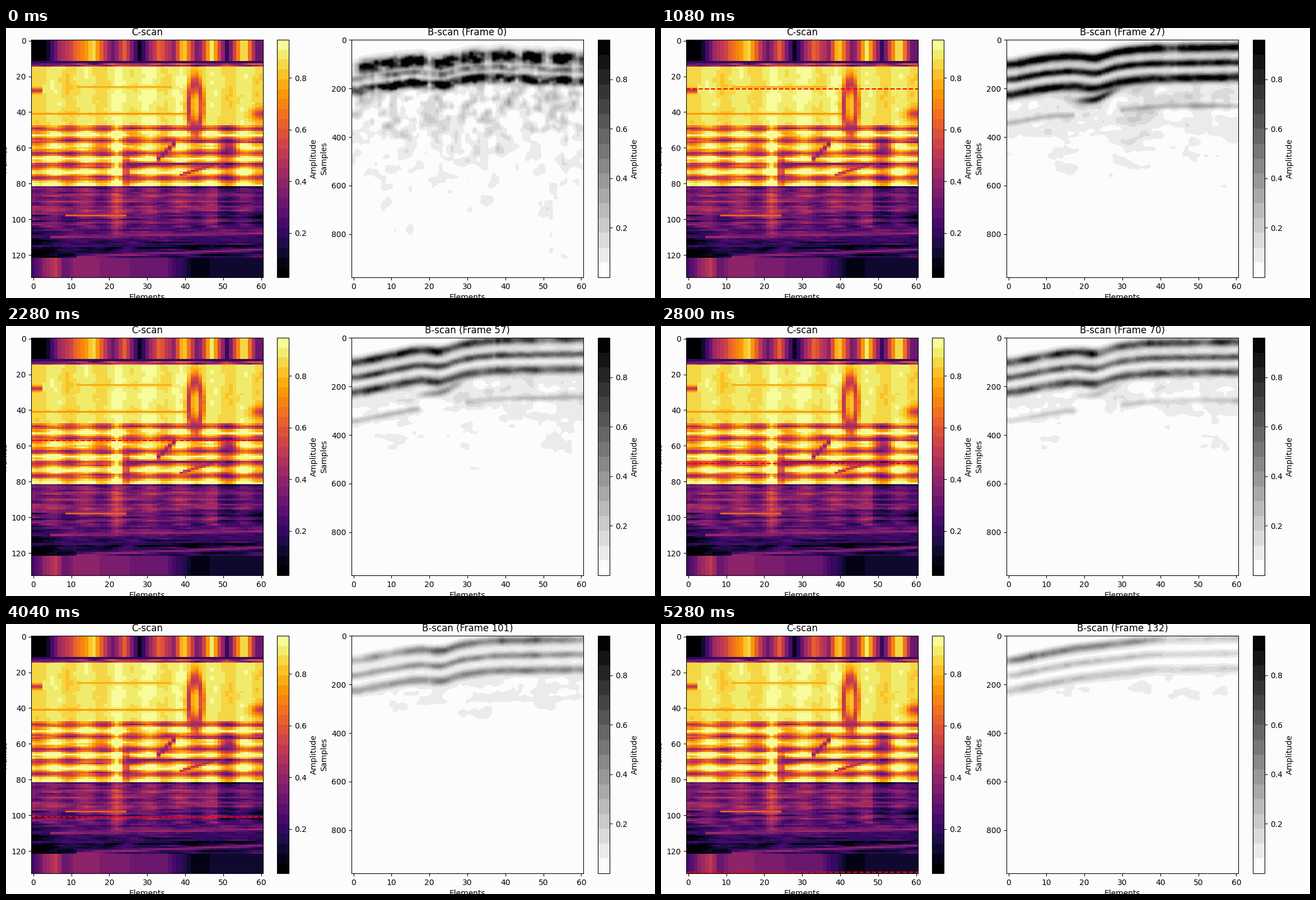
These frames come from a looping animation (1159x483 px, 5.32 s). A matplotlib script:

```python
import numpy as np
import matplotlib.pyplot as plt
from matplotlib.animation import FuncAnimation
from matplotlib.colors import ListedColormap

W, H, DPI = 1159, 483, 100
FRAMES, COLS, DEPTH = 133, 61, 978
PAPER = "#fcfcfc"
rng = np.random.default_rng(7)
plt.rcParams["font.family"] = "DejaVu Sans"

elements = np.arange(COLS)
rows = np.arange(FRAMES)[:, None]
depth = np.arange(0, DEPTH, 2)[:, None]


def smooth(a, sigma, axis):
    reach = int(3 * sigma) + 1
    kernel = np.exp(-0.5 * (np.arange(-reach, reach + 1) / sigma) ** 2)
    kernel /= kernel.sum()
    pad = [(0, 0), (0, 0)]
    pad[axis] = (reach, reach)
    return np.apply_along_axis(np.convolve, axis, np.pad(a, pad, mode="reflect"),
                               kernel, "valid")


def noise(count, sy, sx):
    field = smooth(smooth(rng.standard_normal((count, COLS)), sy, 0), sx, 1)
    return field / field.std()


def bump(x, centre, width):
    return np.exp(-((x - centre) / width) ** 2)


def wave(x, peak, period):
    return np.cos(2 * np.pi * (x - peak) / period)


def sigmoid(x):
    return 1 / (1 + np.exp(-np.clip(x, -60, 60)))


def curve(*points):
    """Piecewise-linear profile across the elements."""
    return np.interp(elements, *zip(*points))


def make_cscan():
    coupling = wave(elements, 5.5, 8.33)
    head = curve((3, .03), (7, .42), (16, .85), (21, .3), (24, .62), (28, .1), (33, .62),
                 (37, .4), (39.5, .88), (43.5, .3), (47, .9), (51, .2), (55.5, .95), (59, .3))
    tail = curve((0, .24), (6, .52), (8, .31), (12, .4), (28, .32), (34, .33), (42, .1), (60, .12))
    bright = .87 + .03 * coupling + .035 * bump(elements, 28.5, 8) ** .5
    bright = np.minimum(bright, .925) + .01 * noise(FRAMES, 2, .6)

    # Seeded stripes that climb to the right in the deepest rows
    slanted = rows + np.where(rows > 95, elements / 24, 0)
    stripes = np.interp(slanted, rows[:, 0], rng.normal(0, .065, FRAMES))
    striped = .74 - .2 * wave(rows, 49, 7) + .09 * coupling + .6 * stripes
    striped += .2 * bump(elements, 22, 1.2) - .12 * bump(elements, 51, 3)
    dark = np.interp(slanted, [82, 103, 109, 121], [.37, .33, .2, .15]) + stripes
    dark += np.where(rows < 105, .05 * coupling - .08 * (elements > 48),
                     -.13 * bump(elements, 0, 5))
    dark += .12 * bump(elements, 22, 1.5) * (rows < 111)

    scan = np.where(rows < 48, bright, striped + .05 * noise(FRAMES, .5, 2.5))
    scan = np.where(rows < 82, scan, dark + .04 * noise(FRAMES, .3, 1.5))

    def blend(mask, value):
        scan[:] += mask * (value - scan)

    def streak(c0, r0, c1, r1, value, width=.7):
        line = r0 + (r1 - r0) * (elements - c0) / (c1 - c0)
        blend(bump(rows, line, width) * (elements >= c0) * (elements <= c1), value)

    ring = np.hypot((elements - 42.7) / 1.7, (rows - 36.5) / 12.5)
    blend(.85 * bump(ring, 1, .45), .45)
    blend(.8 * bump(elements, 24.5, .9) * bump(rows, 73, 11), .35)
    blend(.8 * bump(elements, 51.5, 2.2) * bump(rows, 60, 3), .32)
    blend(.8 * bump(elements, 60, 2.5) * bump(rows, 41, 3), .42)
    streak(0, 28, 2, 28, .5, 1.3)
    streak(12, 26, 36, 26, .77)
    streak(0, 41, 40, 41, .73)
    streak(33, 66, 37, 58, .38, 1.6)
    streak(39, 75, 47, 70, .45, .9)
    streak(25, 69, 50, 69, .35)
    streak(9, 98, 24, 98, .62)
    streak(5, 110, 60, 108, .42)
    streak(12, 121, 60, 117, .4, .9)

    scan[:12] = head
    scan[12] = .2
    scan[13:15] = .41 + .09 * noise(2, .3, 1.5)
    scan[122:] = tail
    return np.clip(scan, .03, .948)


cscan = make_cscan()
mottle = [noise(len(depth), 6, .7) for _ in range(2)]
layers = [noise(len(depth), 5, 2.2) for _ in range(2)]
ripple = [noise(len(depth), 4, .6) for _ in range(2)]


def drift(pair, phase):
    return np.cos(phase) * pair[0] + np.sin(phase) * pair[1]


def surface_depth(t, early, late):
    end = 17 + 13 * wave(t, 29, 56)
    line = curve((0, 104), (10, 72 + .1 * end), (18, 44 + .7 * end), (37, end + 6), (60, end))
    line += 20 * (1 - late) * bump(elements, 23, 3.5)
    line += early * (14 + .9 * elements)
    return smooth(line[None], 1.2, 1)[0]


def bscan(frame):
    t = min(max(frame, 11), 122)
    early = np.clip((15 - t) / 4, 0, 1)
    late = np.clip((t - 100) / 22, 0, 1)
    phase = t / 14
    surface = surface_depth(t, early, late)
    offset = 124 - 32 * early
    last = surface + offset

    near = .93 * cscan[frame] ** .8
    gap = ((1 + wave(elements, 20, 7.8)) / 2) ** 3 * (elements > 17)
    broken = .9 * (1 - .65 * gap) * sigmoid((elements - 1.5) * 2)
    near = early * broken + (1 - early) * near
    common = (.55 * np.median(near) + .45 * near) * (1 - .45 * late)
    rough = 1 + (.07 + .2 * early) * drift(ripple, phase)

    # Three echoes over a faint pedestal
    echo = near * bump(depth, surface, 17 + 7 * early)
    echo = np.maximum(echo, (.95 - .6 * early) * common * bump(depth, surface + offset / 2, 15))
    echo = np.maximum(echo, common * bump(depth, last, 18))
    inside = sigmoid((depth - surface + 22) / 6) * sigmoid((last + 22 - depth) / 9)
    value = (echo + .13 * common * inside) * rough
    value += .11 * common * bump(depth, surface, 42 + 15 * early)

    # Deeper reflection, split around a strong spot in the middle
    spot = .8 * bump(t, 27, 35) * (1 - early) * bump(elements, 23.5, 7) ** 2
    value += spot * bump(depth, last + 45 - 2.6 * (elements - 23), 15)
    sides = (elements < 18) | (elements > 29)
    value += .22 * bump(t, 36, 45) * (1 - early) * sides * bump(depth, last + offset - 8, 13)

    # Speckle that fades with depth, reaching further under some elements
    grain = early * drift(mottle, phase) + (1 - early) * (
        .6 * drift(layers, phase) + .5 * drift(mottle, phase))
    below = sigmoid((depth - last - 25) / 12)
    reach = (280 - 1.6 * (t - 15)) * (1 + .3 * wave(elements, 12, 21))
    level = .12 - .0007 * (t - 15)
    fade = level * np.exp(-np.maximum(depth - 230, 0) / reach)
    value += below * fade * (1 + (.55 + .2 * early) * grain)
    value += early * .2 * bump(elements, 22.5, 2) * below * np.exp(-depth / 300)
    return np.clip(value, 0, .96)


fig = plt.figure(figsize=(W / DPI, H / DPI), dpi=DPI, facecolor=PAPER)


def panel(x0, x1, top=21, bottom=446):
    return fig.add_axes([x0 / W, 1 - bottom / H, (x1 - x0) / W, (bottom - top) / H],
                        facecolor=PAPER)


def colorbar(image, x0, x1):
    bar = fig.colorbar(image, cax=panel(x0, x1), ticks=[.2, .4, .6, .8])
    bar.set_label("Amplitude")


inferno = ListedColormap(plt.get_cmap("inferno")(np.linspace(0, .985, 24)))
greys = ListedColormap([(g, g, g) for g in np.linspace(252, 3, 16) / 255])

left = panel(45.3, 459.1)
c_image = left.imshow(cscan, cmap=inferno, vmin=.028, vmax=.948, aspect="auto",
                      interpolation="nearest")
left.set(title="C-scan", xlabel="Elements", ylabel="Frames")
marker = left.axhline(0, color="red", linestyle="--")
colorbar(c_image, 484.2, 505.3)

right = panel(617.2, 1030.8)
b_image = right.imshow(bscan(0), cmap=greys, vmin=0, vmax=.96, aspect="auto",
                       interpolation="hanning", extent=(-.5, 60.5, DEPTH - .5, -.5))
right.set(xlabel="Elements", ylabel="Samples", yticks=range(0, 801, 200))
title = right.set_title("B-scan (Frame 0)")
colorbar(b_image, 1057, 1078.2)


def update(frame):
    marker.set_ydata([frame, frame])
    marker.set_visible(frame > 0)
    b_image.set_data(bscan(frame))
    title.set_text(f"B-scan (Frame {frame})")
    return marker, b_image, title


animation = FuncAnimation(fig, update, frames=FRAMES, interval=40, repeat=True,
                          repeat_delay=0, blit=False)
plt.show()
```
